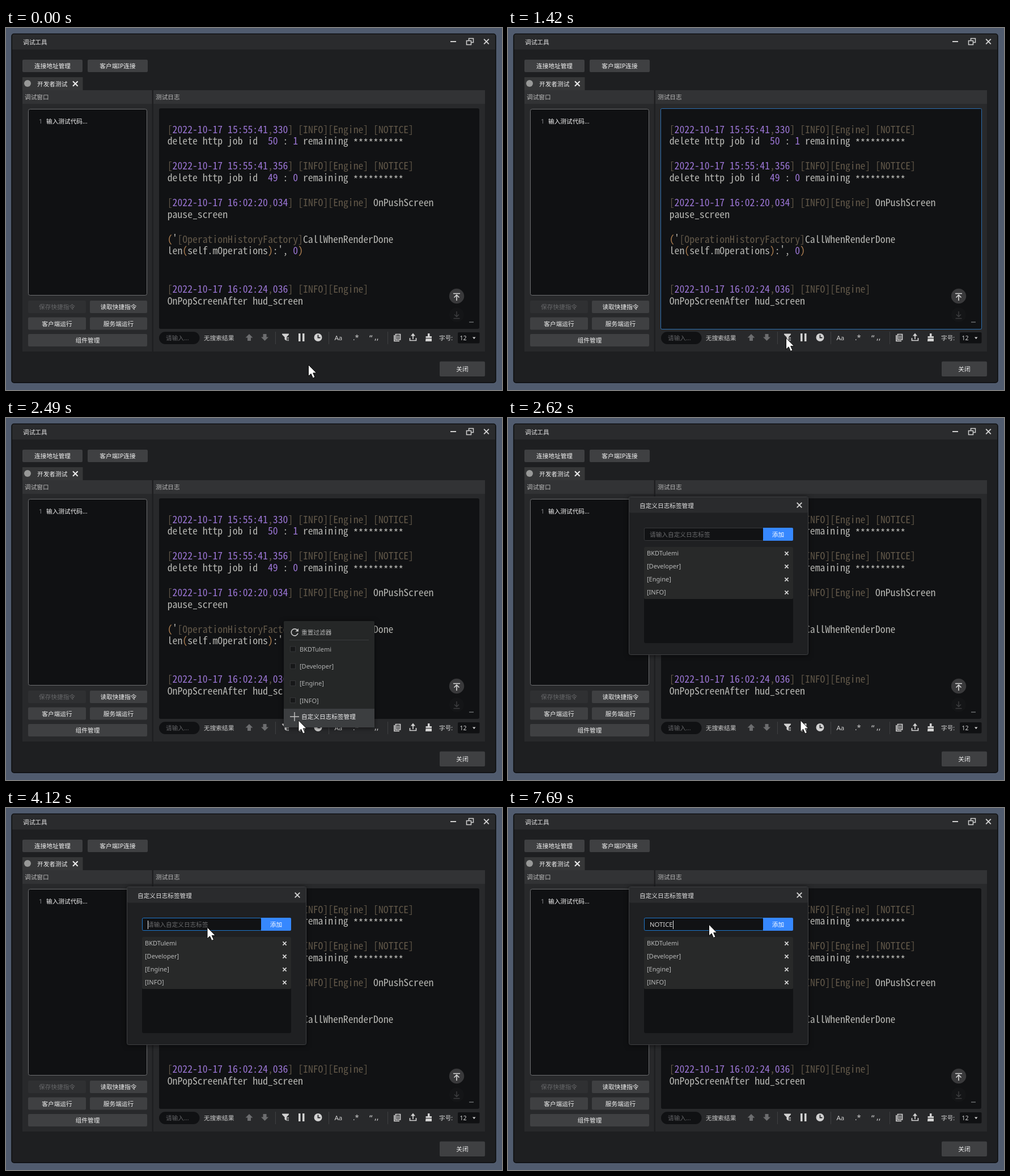
An HTML page for the animation above (8 s loop, 875 by 640 pixels).

```html
<!DOCTYPE html>
<html lang="zh-CN">
<head>
<meta charset="utf-8">
<title>调试工具</title>
<style>
  html, body { margin: 0; width: 100%; height: 100%; overflow: hidden; background: #505b6e; }
  svg { display: block; width: 875px; height: 640px; }
  text { white-space: pre; font: 10.67px "Noto Sans", "Noto Sans CJK SC", "Noto Sans CJK", sans-serif; }
  .latin { font-size: 11px; }
  .log text { fill: #b6b6b2; font-family: "Noto Sans Mono CJK SC", "Noto Sans Mono CJK JP", "Liberation Mono", monospace; }
  .log .dim { fill: #625849; }
  .log .num { fill: #9c76d6; }
  .log .par { fill: #b08052; }
  .pop { filter: drop-shadow(0 1px 4px rgba(0, 0, 0, .55)); }
</style>
</head>
<body>
<svg id="stage" viewBox="0 0 875 640"></svg>
<script>
const LOOP = 8000;
const $ = id => document.getElementById(id);

// Markup helpers. Text is placed by its vertical centre.
const box = (x, y, w, h, fill, r = 0, more = '') =>
  `<rect x="${x}" y="${y}" width="${w}" height="${h}" rx="${r}" fill="${fill}" ${more}/>`;
const label = (x, y, s, fill = '#e2e2e2', more = '') =>
  `<text x="${x}" y="${y + 4}" fill="${fill}" ${more}>${s}</text>`;
const mid = (x, y, s, fill) => label(x, y, s, fill, 'text-anchor="middle"');
const line = (d, color, w = 1, more = '') =>
  `<path d="${d}" fill="none" stroke="${color}" stroke-width="${w}" ${more}/>`;
const shape = (d, fill, more = '') => `<path d="${d}" fill="${fill}" ${more}/>`;
const cross = (x, y, r, w, color = '#d4d4d4') =>
  line(`M${x - r} ${y - r}l${2 * r} ${2 * r}m0 ${-2 * r}l${-2 * r} ${2 * r}`, color, w);
const button = (x, y, w, h, s, off) =>
  box(x, y, w, h, off ? '#2f3032' : '#3f4042', 2) +
  mid(x + w / 2, y + h / 2, s, off ? '#67686a' : '#f2f2f2');

const tags = ['BKDTulemi', '[Developer]', '[Engine]', '[INFO]'];

const logLines = [
  [185.5, '[2022-10-17 15:55:41,330] [INFO][Engine] [NOTICE]'],
  [206, 'delete http job id  50 : 1 remaining **********'],
  [250, '[2022-10-17 15:55:41,356] [INFO][Engine] [NOTICE]'],
  [270.5, 'delete http job id  49 : 0 remaining **********'],
  [315, '[2022-10-17 16:02:20,034] [INFO][Engine] OnPushScreen'],
  [335.5, 'pause_screen'],
  [379.5, "('[OperationHistoryFactory]CallWhenRenderDone"],
  [400, "len(self.mOperations):', 0)"],
  [468, '[2022-10-17 16:02:24,036] [INFO][Engine]'],
  [489, 'OnPopScreenAfter hud_screen']
];

function paint(s) {
  return s.replace(/\*+|\[[A-Za-z]+\]|[\[\]]|,(?=\d)|[()]|\d[\d:-]*/g, m => {
    if (m[0] === '*') return `<tspan dy="3">${m}</tspan>`;
    const kind = /^\d/.test(m) ? 'num' : /[()]/.test(m) ? 'par' : 'dim';
    return `<tspan class="${kind}">${m}</tspan>`;
  });
}

function frame() {
  return box(0, 0, 875, 640, '#505b6e') +
    box(10, 10.5, 854, 616.5, '#1e1f21', 4, 'stroke="#090a0b" stroke-width="1.4"') +
    shape('M11 38V14a3 3 0 0 1 3-3H860a3 3 0 0 1 3 3V38Z', '#2a2b2d') +
    label(30, 25, '调试工具') +
    line('M784 24H794', '#cfcfcf', 2) +
    line('M816.5 22V18.5H824.5V25.5H821M812.5 22.5H820.5V29.5H812.5Z', '#cfcfcf', 1.5) +
    cross(847.5, 24, 4.3, 1.9) +
    button(29, 56, 106, 22, '连接地址管理') +
    button(144, 56, 106, 22, '客户端IP连接') +
    box(29, 87, 106.5, 24, '#363738') +
    '<circle cx="38" cy="98" r="6" fill="#989998"/>' +
    label(55, 98.5, '开发者测试', '#eee') + cross(122.3, 98.5, 4.3, 2, '#eee') +
    button(765, 589.5, 80, 26.5, '关闭');
}

function leftPanel() {
  return box(29, 110, 228.5, 462, '#28292b') + box(29, 110, 228.5, 24, '#323335') +
    label(33, 122, '调试窗口', '#b9b9b9') +
    box(39.5, 143.5, 209, 329, '#101113', 3, 'stroke="#6d6e70"') +
    label(58, 165, '1', '#85868a') + label(71, 165, '输入测试代码...', '#f4f4f4') +
    button(39, 482, 102, 22, '保存快捷指令', true) +
    button(148, 482, 101, 22, '读取快捷指令') +
    button(39, 511.5, 102, 22, '客户端运行') +
    button(148, 511.5, 101, 22, '服务端运行') +
    button(39, 541, 210, 22, '组件管理');
}

function toolbar() {
  const c = '#d2d2d2', grey = '#6c6d6f';
  const split = x => line(`M${x}.5 537V559`, '#3f4042');
  return box(270, 537, 71.5, 22, '#101113', 11) +
    label(282, 548, '请输入...', '#626366') + label(349, 548, '无搜索结果', '#cfcfcf') +
    shape('M429 541L435.5 547.5H432V553H426V547.5H422.5Z', grey) +
    shape('M456.5 553L450 546.5H453.5V541H459.5V546.5H463Z', grey) +
    split(475) +
    shape('M487 540.5H499V542L495 546.5V553L491.5 550.5V546.5L487 542Z', c) +
    line('M495.5 547.5H499M495.5 550H499M495.5 552.5H499', c) +
    box(516, 540, 3.5, 14, c) + box(523, 540, 3.5, 14, c) +
    `<circle cx="550.5" cy="547" r="7" fill="${c}"/>` +
    line('M550.5 542.5V547.5H554.5', '#28292b', 1.8) +
    split(569) +
    label(579.5, 547.5, 'Aa', c, 'font-weight="600" style="font-size:11.5px"') +
    label(612, 547.5, '.*', c, 'font-weight="700" style="font-size:13px"') +
    label(641, 549, '“', c, 'font-weight="700" style="font-size:15px"') +
    label(650, 546.5, ',,', c, 'font-weight="700" style="font-size:14px"') +
    split(673) +
    line('M685 543V553.5H694M687.5 541.5H695.5V551H687.5Z', c, 1.7) +
    line('M689 544.5H694M689 546.5H694M689 548.5H694', c) +
    line('M712.5 548V552.5H723.5V548M718 550V542', c, 1.7) + shape('M718 539.5L722 544.5H714Z', c) +
    shape('M744 540H747.5V545H751V548H740.5V545H744ZM740.5 549H751V554H740Z', c) +
    label(764, 548, '字号:', c) +
    box(797, 538, 38.5, 19.5, '#101113', 2) + label(800.5, 548, '12', c) +
    shape('M823 546.5H828.5L825.75 550Z', c);
}

function rightPanel() {
  const rows = logLines.map(([y, s]) => `<text x="284.7" y="${y}">${paint(s)}</text>`).join('');
  return box(260, 110, 585, 462, '#28292b') + box(260, 110, 585, 24, '#323335') +
    label(264, 122, '测试日志', '#b9b9b9') +
    box(270, 142, 565, 390, '#111214', 3) +
    `<g class="log" id="log">${rows}</g>` +
    '<circle cx="795" cy="474" r="13.2" fill="#39393b"/><circle cx="795" cy="507" r="13" fill="#141517"/>' +
    line('M789 469.5H801M795 482V472.5M790.5 476.5L795 472L799.5 476.5', '#d6d6d6', 1.6) +
    line('M789.5 513.5H800.5M795 501V510M791 506.5L795 510.5L799 506.5', '#3c3d3f', 1.5) +
    line('M817 520H825', '#66676a', 1.6) +
    box(269.5, 142.5, 566, 390, 'none', 2, 'stroke="#2c6eae" id="logFocus"') +
    toolbar();
}

function menu() {
  const items = tags.map((s, i) => {
    const y = 409 + i * 30.2;
    return box(501.5, y - 5, 9, 9, '#161718', 0, 'stroke="#353638"') +
      label(518, y, s, '#b2b3b3', 'class="latin"');
  }).join('');
  return `<g class="pop" id="menu">${box(490, 359, 160, 188, '#252727', 2)}` +
    box(490, 514, 160, 33, '#3c3e40', 0, 'id="hover"') +
    line('M514.2 375.5A6 6 0 1 0 515 380.5', '#c4c4c4', 1.6) + shape('M516 372V377.5H510.5Z', '#c4c4c4') +
    label(521, 379, '重置过滤器', '#b2b3b3') + line('M500 392.5H640', '#3a3c3d') + items +
    line('M509 520V536M501 528H517', '#c4c4c4', 1.4) +
    `<g id="manage" fill="#b2b3b3">${label(521, 528, '自定义日志标签管理', 'inherit')}</g></g>`;
}

function dialog() {
  const rows = tags.map((s, i) =>
    label(245, 239 + i * 23, s, '#b9baba', 'class="latin"') + cross(491.5, 239.5 + i * 23, 3.1, 1.7)).join('');
  return `<g id="dialog"><g class="pop">${box(213.5, 139.5, 316, 279, '#1f2022', 3, 'stroke="#3f4042"')}</g>` +
    box(214, 140, 315, 27.5, '#2a2b2d', 2) +
    label(232, 154.5, '自定义日志标签管理') + cross(514, 154, 4.3, 1.9) +
    box(240.5, 194.5, 210, 22, '#111214', 2, 'stroke="#38393b" id="field"') +
    `<g id="hint">${label(250, 206, '请输入自定义日志标签', '#6b6c6e')}</g>` +
    label(250, 206, '', '#d2d2d2', 'id="typed" style="font-size:11.3px"') +
    box(250, 199, 1, 15, '#e8e8e8', 0, 'id="caret"') +
    shape('M450 194H501a2 2 0 0 1 2 2V215a2 2 0 0 1-2 2H450Z', '#3688ff') + mid(476.5, 206, '添加', '#fff') +
    box(240, 228, 263, 170, '#111214', 3) + box(240, 228, 263, 92, '#282929', 2) + rows + '</g>';
}

$('stage').innerHTML = frame() + leftPanel() + rightPanel() + menu() + dialog() +
  shape('M0 0V20L4.6 15.8L8 23.4L11.5 21.8L8.2 14.4H14.2Z', '#fff',
    'id="cursor" stroke="#0b0b0b" stroke-width="1" stroke-linejoin="round"');

// Log text sits on a fixed character grid.
const pen = document.createElement('canvas').getContext('2d');
pen.font = '100px ' + getComputedStyle(document.querySelector('.log text')).fontFamily;
$('log').querySelectorAll('text').forEach(t => {
  t.style.fontSize = 886.7 / pen.measureText('0').width + 'px';
});

// Pointer: start time, number of 70 ms hops, end point, ease-out power.
const TICK = 70;
const moves = [
  [400, 4, 504, 557.5, 1.3],
  [810, 4, 490.5, 548, 1.3],
  [2020, 3, 516, 534.5, 1.3],
  [3080, 8, 359.5, 231, 1.3],
  [3640, 4, 346.5, 214.5, 1.3],
  [3980, 3, 355, 211, 1],
  [4450, 3, 354.5, 206, 1]
];
const typing = [[5250, 1], [5580, 2], [6110, 3], [6370, 4], [6470, 5], [6570, 6]];

function pointer(t) {
  let x = 533.5, y = 595.5;
  for (const [start, hops, tx, ty, pow] of moves) {
    if (t < start) break;
    const k = Math.min(1, (Math.floor((t - start) / TICK) + 1) / hops);
    const e = 1 - (1 - k) ** pow;
    x += (tx - x) * e;
    y += (ty - y) * e;
  }
  return [x, y];
}

const within = (t, a, b) => t >= a && t < b;
const show = (id, on) => { $(id).style.display = on ? '' : 'none'; };

function draw(t) {
  show('logFocus', within(t, 70, 200) || within(t, 1420, 2490));
  show('menu', within(t, 1490, 2620));
  show('hover', t >= 2020);
  $('manage').setAttribute('fill', t >= 2020 ? '#eee' : '#b2b3b3');
  show('dialog', t >= 2620);
  $('field').setAttribute('stroke', t >= 4050 ? '#1f78cc' : '#38393b');

  const count = typing.reduce((n, [at, len]) => t >= at ? len : n, 0);
  const typed = $('typed');
  typed.textContent = 'NOTICE'.slice(0, count);
  show('hint', !count);
  show('caret', within(t, 4050, 4590) || within(t, 5250, 7160) || t >= 7690);
  $('caret').setAttribute('x', count ? Math.round(250 + typed.getComputedTextLength()) : 250);

  $('cursor').setAttribute('transform', `translate(${pointer(t)})`);
}

const begin = performance.now();
function tick() {
  draw((performance.now() - begin) % LOOP);
  requestAnimationFrame(tick);
}
tick();
</script>
</body>
</html>
```
